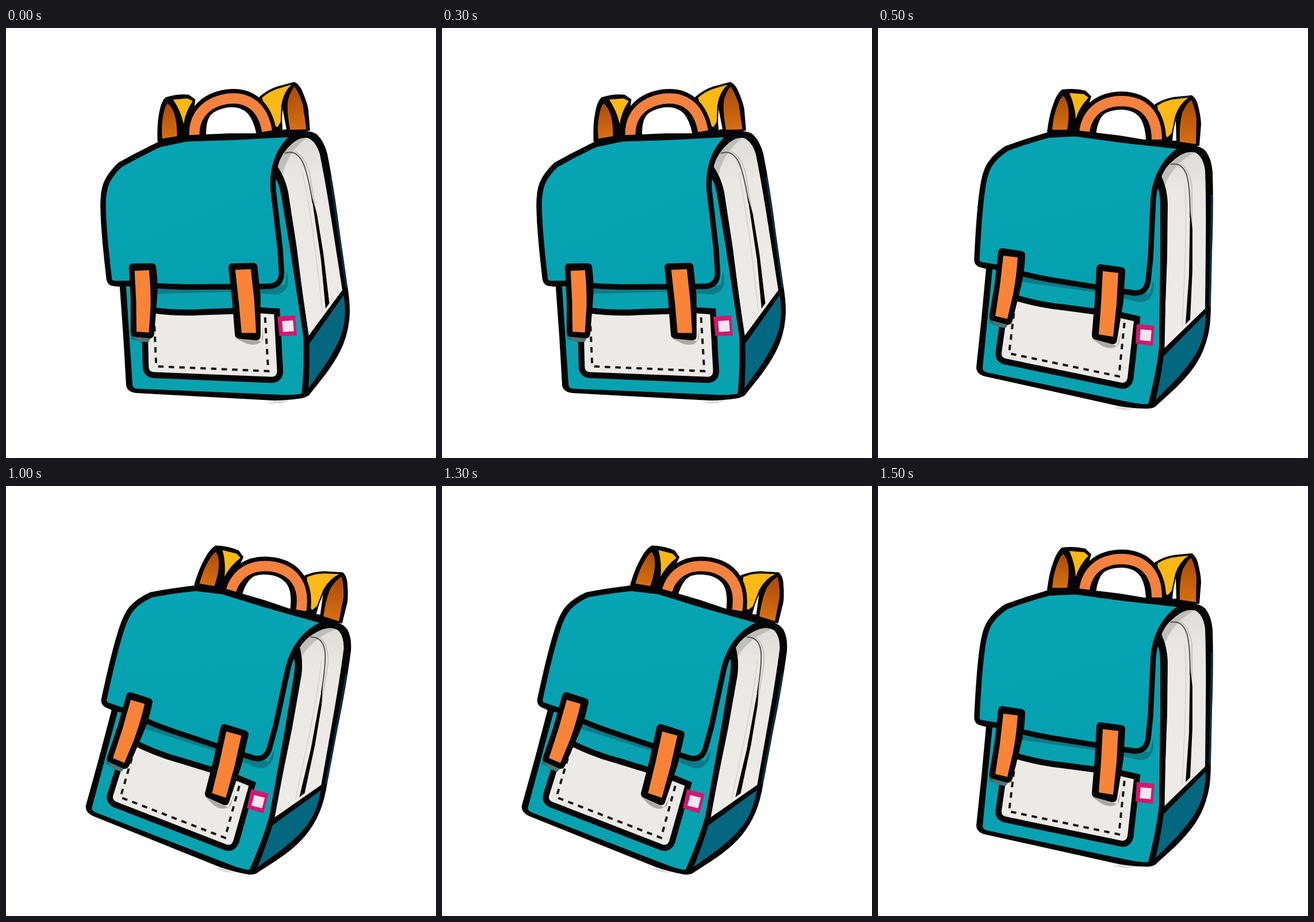
These frames come from a looping animation (748x748 px, 2 s). An HTML page:

```html
<!DOCTYPE html>
<html lang="en">
<head>
<meta charset="utf-8">
<title>Rocking backpack</title>
<style>
  html, body { margin: 0; width: 100%; height: 100%; overflow: hidden; background: #fff; }
  svg { display: block; width: 100vw; height: 100vh; }
  .ink { fill: #050505; }
  .line { fill: none; stroke: #050505; stroke-linejoin: round; stroke-linecap: round; }
</style>
</head>
<body>
<svg viewBox="0 0 748 748">
  <defs>
    <linearGradient id="flapTone" x1="0" y1="0" x2="0.3" y2="1">
      <stop offset="0" stop-color="#08a5b4"/>
      <stop offset="1" stop-color="#04a0b0"/>
    </linearGradient>
    <linearGradient id="sideTone" x1="0" y1="0" x2="0" y2="1">
      <stop offset="0" stop-color="#dddcd8"/>
      <stop offset="0.2" stop-color="#e9e8e4"/>
      <stop offset="1" stop-color="#edece8"/>
    </linearGradient>
    <linearGradient id="lining" x1="0" y1="0" x2="0" y2="1">
      <stop offset="0" stop-color="#a84c08"/>
      <stop offset="1" stop-color="#d96f12"/>
    </linearGradient>
    <path id="frontShape" d="M199 420L190 510L182 592Q182 597 189 599L433 650Q455 655 470 654Q484 600 489 556L491 400L491 310Q491 285 486 278L470 300Z"/>
    <path id="pocketShape" d="M237 474Q280 487 321 491L419 504L445 510L434 609Q432 618 424 617L222 575Q214 573 215 565L222 515Z"/>
    <path id="flapShape" d="M172 403C174 360 177 312 182 279Q186 251 195 237Q204 223 223 210Q260 196 298 186L344 184L425 195L534 207C503 223 483 254 479 296L474 400L470 439Q467 462 446 461L425 458L300 438Q250 429 212 417L180 412Q172 410 172 403Z"/>
    <clipPath id="frontClip"><use href="#frontShape"/></clipPath>
    <clipPath id="pocketClip"><use href="#pocketShape"/></clipPath>
  </defs>

  <g id="bag">
    <path d="M408 661L420 659L448 663L430 665Z" fill="#dcdcdc"/>

    <!-- left shoulder strap -->
    <path class="ink" d="M294 181Q298 150 305 132Q311 114 320 107Q342 104 361 109L371 119L352 182Z"/>
    <path d="M303 177Q305 153 312 135Q317 122 322 118Q329 125 331 139Q333 155 329 177Z" fill="url(#lining)"/>
    <path d="M333 113L358 115L366 121Q350 138 344 158Q343 136 333 113Z" fill="#fcb814"/>

    <!-- right shoulder strap -->
    <path class="ink" d="M481 133Q497 123 515 120L546 117Q553 122 556 132Q562 155 562 168L559 205L490 203L484 158Z"/>
    <path d="M486 135Q500 126 515 124L540 121Q524 132 517 153L511 182L504 190L490 180Z" fill="#fcb814"/>
    <path d="M518 160L519 196L512 196L514 178Z" fill="#fff"/>
    <path d="M545 125Q551 138 554 158L553 202L525 198Q524 164 530 146Q537 131 545 125Z" fill="url(#lining)"/>

    <!-- handle -->
    <path class="ink" d="M359 190C363 149 386 127 425 127C464 128 485 153 485 205Z"/>
    <path class="line" d="M359 183C363 149 386 127 425 127C464 128 485 153 485 199" stroke-width="33" style="stroke-linecap:butt"/>
    <path d="M379 186Q382 160 393 150Q404 142 425 142Q447 143 457 158Q465 171 466 195Z" fill="#fff"/>
    <path d="M359 181C363 149 386 127 425 127C464 128 485 153 485 194" fill="none" stroke="#f3823f" stroke-width="18"/>

    <!-- body outline -->
    <path class="ink" d="M168 404C171 362 172 315 177 284Q181 250 190 236Q201 219 220 208Q255 194 296 181Q320 177 346 178L420 187L505 201L545 203Q563 206 570 214Q580 227 582 250Q584 310 581 390L579 482Q579 515 574 535Q568 560 556 580Q543 602 516 628L482 659Q474 663 464 662Q445 662 420 658L186 606Q171 602 171 590L180 505L188 419Q168 414 168 404Z"/>
    <path d="M581 290L579 390L577 485" fill="none" stroke="#0a3445" stroke-width="3"/>

    <!-- side -->
    <path d="M493 257Q503 236 525 222Q540 213 553 217Q566 225 569 248Q571 300 570 390L569 488L497 558L503 400L504 305Q503 280 493 257Z" fill="url(#sideTone)"/>
    <path d="M493 257Q503 236 525 222L538 216L550 217Q520 233 503 264L500 273Z" fill="#aaa9a6" opacity="0.6"/>
    <path d="M509 237Q529 233 537 256Q543 275 543 330" fill="none" stroke="#55524e" stroke-width="2"/>
    <path d="M526 236Q541 244 546 275L546 400" fill="none" stroke="#b8b6b1" stroke-width="1.4"/>
    <path d="M534 275Q537 320 534 410L529 520" fill="none" stroke="#cfcdc8" stroke-width="1.2"/>
    <path class="ink" d="M543 315L547 350L547 420L543 507L535 515L541 430Z"/>
    <path d="M495 573L570 497Q570 530 559 555Q548 580 516 614L483 647Q492 610 495 573Z" fill="#03677f"/>

    <!-- front -->
    <use href="#frontShape" fill="#08a1b0"/>
    <g clip-path="url(#frontClip)" fill="#0a7480" opacity="0.8">
      <path d="M246 433L378 452L380 460L246 441Z"/>
      <path d="M425 460L472 462L479 440Q483 476 455 477L425 470Z"/>
      <path d="M193 505L228 516L210 519L193 513Z"/>
    </g>
    <path class="line" d="M492 268Q499 284 499 310L497 400L494 558Q488 612 475 655" stroke-width="9"/>

    <!-- pocket -->
    <use href="#pocketShape" class="line" stroke-width="21" style="stroke-linejoin:miter"/>
    <use href="#pocketShape" fill="#ebeae6"/>
    <g clip-path="url(#pocketClip)">
      <path d="M371 540L416 553L423 527L419 550Q408 562 390 553Z" fill="#aaa9a5"/>
      <path d="M239 475L228 566L419 606L429 510" fill="none" stroke="#16181a" stroke-width="4" stroke-dasharray="9.5 8.9" stroke-dashoffset="-3"/>
    </g>
    <path d="M197 509L227 515L222 522L205 519Z" fill="#4f7477"/>

    <!-- tag, with a plain square on it -->
    <path d="M450 515L481 518L478 553L448 549Z" fill="#d3186f"/>
    <rect x="456" y="525" width="19" height="19" fill="#f3e6ee" transform="rotate(5 466 535)"/>

    <!-- flap -->
    <use href="#flapShape" fill="url(#flapTone)"/>
    <use href="#flapShape" class="line" stroke-width="9.5"/>

    <!-- buckles -->
    <path class="ink" d="M217 383L250 388Q257 390 256 396Q255 425 249 449L234 509Q232 517 225 516L198 509Q192 507 194 499L203 445L209 390Q210 382 217 383Z"/>
    <path d="M218 396L243 399Q241 432 235 463L225 506L204 501L212 449Z" fill="#f98438"/>
    <path class="ink" d="M388 411L424 416Q431 418 430 424L427 475L416 542Q415 551 407 550L378 542Q371 540 372 533L377 475L380 418Q381 410 388 411Z"/>
    <path d="M391 423L418 426L415 480L409 537L384 533L388 480Z" fill="#f98438"/>
  </g>
</svg>
<script>
  const bag = document.getElementById('bag');
  const HOLD = 500;
  const poses = [
    'translate(0 1.3) rotate(-9.4 374 374)',
    '',
    'translate(0.5 1.8) rotate(9.4 374 374)',
    ''
  ];

  function draw(ms) {
    bag.setAttribute('transform', poses[Math.floor(ms / HOLD) % poses.length]);
  }

  const start = performance.now();
  function tick() {
    draw(performance.now() - start);
    requestAnimationFrame(tick);
  }
  draw(0);
  requestAnimationFrame(tick);
</script>
</body>
</html>
```
